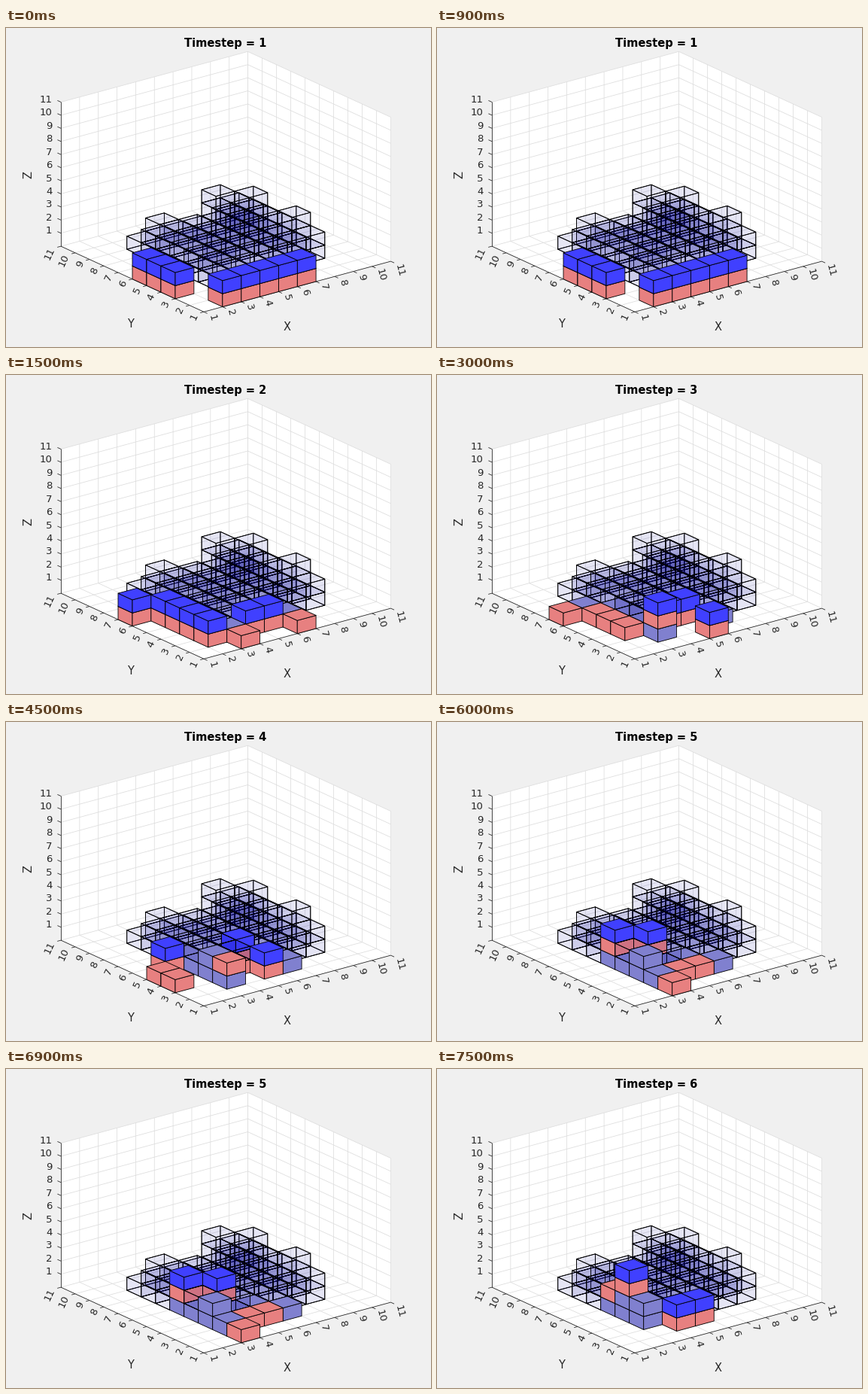
A matplotlib script that plays this animation: 565 px wide and 424 px high, repeating every 8 s.

```python
import numpy as np
import matplotlib.pyplot as plt
from matplotlib.animation import FuncAnimation
from matplotlib.collections import LineCollection, PolyCollection

W, H, DPI = 565, 424, 100
PX = 72 / DPI

ORIGIN = np.array([263.0, 377.3])
AXES = np.array([[24.85, -6.72], [-19.0, -8.72], [0.0, -17.42]])
LO, HI = 1, 11

INK = "#262626"
GRID = "#dedede"
ROBOT = (0.905, 0.5, 0.5, 1)
LOAD = (0.25, 0.25, 1, 1)
BLOCK = (0.5, 0.5, 0.81, 1)
PLAN = (0, 0, 0.6, 0.05)

# planned heights: rows are y = 3..8, columns x = 3..8
PLAN_HEIGHTS = [
    [2, 2, 1, 2, 2, 2],
    [2, 2, 2, 2, 2, 3],
    [1, 2, 2, 3, 3, 2],
    [2, 2, 2, 3, 3, 2],
    [2, 2, 2, 1, 2, 3],
    [1, 2, 1, 1, 3, 2],
]

# per step: robots with a load, robots without
LOADED = [
    [(x, 1) for x in range(2, 7)] + [(1, y) for y in (3, 4, 5)],
    [(2, y) for y in range(2, 6)] + [(1, 6), (4, 2), (5, 2)],
    [(3, 2), (4, 3), (5, 3), (5, 1)],
    [(2, 5), (5, 4), (5, 2)],
    [(3, 5), (4, 4)],
    [(3, 4), (4, 2), (5, 2)],
]
EMPTY = [
    [],
    [(3, 1), (6, 1)],
    [(1, 6), (2, 3), (2, 4), (2, 5)],
    [(1, 3), (1, 4), (3, 2), (4, 3)],
    [(3, 1), (4, 2), (5, 2)],
    [(3, 5)],
]
# blocks set down and picked up on the way into each step
PLACED = [
    [],
    [(3, 2), (6, 2)],
    [(3, 3), (3, 4), (3, 5), (2, 6)],
    [(3, 3), (4, 4)],
    [(5, 3)],
    [(3, 4)],
]
TAKEN = [[], [], [], [(2, 6)], [], [(3, 2), (6, 2)]]

FRONT = [
    [(0, 0, 0), (0, 1, 0), (0, 1, 1), (0, 0, 1)],
    [(0, 0, 0), (1, 0, 0), (1, 0, 1), (0, 0, 1)],
    [(0, 0, 1), (1, 0, 1), (1, 1, 1), (0, 1, 1)],
]
BACK = [
    [(0, 0, 0), (1, 0, 0), (1, 1, 0), (0, 1, 0)],
    [(1, 0, 0), (1, 1, 0), (1, 1, 1), (1, 0, 1)],
    [(0, 1, 0), (1, 1, 0), (1, 1, 1), (0, 1, 1)],
]


def project(points):
    return ORIGIN + (np.asarray(points, float) - (LO, LO, 0)) @ AXES


def stack_heights(step):
    heights = {}
    for s in range(step + 1):
        for cell in PLACED[s]:
            heights[cell] = heights.get(cell, 0) + 1
        for cell in TAKEN[s]:
            heights[cell] -= 1
    return heights


def scene(step):
    """Map each occupied unit cube to its colour."""
    cubes = {}
    for j, row in enumerate(PLAN_HEIGHTS):
        for i, top in enumerate(row):
            for z in range(top):
                cubes[i + 3, j + 3, z] = PLAN
    heights = stack_heights(step)
    for (x, y), top in heights.items():
        for z in range(top):
            cubes[x, y, z] = BLOCK
    for x, y in LOADED[step] + EMPTY[step]:
        cubes[x, y, heights.get((x, y), 0)] = ROBOT
    for x, y in LOADED[step]:
        cubes[x, y, heights.get((x, y), 0) + 1] = LOAD
    return cubes


def faces(step):
    polys, colors = [], []
    cubes = scene(step)
    for cell in sorted(cubes, key=lambda c: (-c[1], -c[0], c[2])):
        color = cubes[cell]
        sides = BACK + FRONT if color == PLAN else FRONT
        for side in sides:
            polys.append(project(np.add(side, cell)))
            colors.append(color)
    return polys, colors


def draw_box(ax):
    walls = [
        [(LO, LO, 0), (HI, LO, 0), (HI, HI, 0), (LO, HI, 0)],
        [(LO, HI, 0), (HI, HI, 0), (HI, HI, HI), (LO, HI, HI)],
        [(HI, LO, 0), (HI, HI, 0), (HI, HI, HI), (HI, LO, HI)],
    ]
    ax.add_collection(PolyCollection([project(w) for w in walls],
                                     facecolors="white", edgecolors="none"))
    grid = []
    for k in range(LO, HI + 1):
        grid += [
            [(k, LO, 0), (k, HI, 0), (k, HI, HI)],
            [(LO, k, 0), (HI, k, 0), (HI, k, HI)],
            [(LO, HI, k), (HI, HI, k), (HI, LO, k)],
        ]
    ax.add_collection(LineCollection([project(g) for g in grid],
                                     colors=GRID, linewidths=0.8 * PX))


def draw_rulers(ax):
    ends = [
        [(LO, LO, 0), (HI, LO, 0)],
        [(LO, LO, 0), (LO, HI, 0)],
        [(LO, HI, 0), (LO, HI, HI)],
    ]
    lines = [project(e) for e in ends]
    style = dict(color=INK, fontsize=13.3 * PX, rotation_mode="anchor")
    for k in range(LO, HI + 1):
        marks = [
            ((k, LO, 0), (4.6, 2.1), (9.5, 3.5), -75, "left"),
            ((LO, k, 0), (-4.8, 1.3), (-11, 2.5), 65, "right"),
            ((LO, HI, k), (-4.6, -2.1), (-11.5, -3), 0, "right"),
        ]
        for point, tick, gap, angle, side in marks:
            p = project(point)
            lines.append([p, p + tick])
            ax.text(*(p + gap), str(k), rotation=angle, ha=side,
                    va="center", **style)
    ax.add_collection(LineCollection(lines, colors=INK, linewidths=0.8 * PX))
    for x, y, name, angle in [(374, 397, "X", 0), (165, 394, "Y", 0),
                              (30, 195, "Z", 90)]:
        ax.text(x, y, name, rotation=angle, color=INK, ha="center",
                va="center", fontsize=14.67 * PX)


plt.rcParams["font.family"] = "DejaVu Sans"
fig = plt.figure(figsize=(W / DPI, H / DPI), dpi=DPI, facecolor="#f0f0f0")
ax = fig.add_axes([0, 0, 1, 1])
ax.set(xlim=(0, W), ylim=(H, 0))
ax.axis("off")

draw_box(ax)
draw_rulers(ax)
cubes_art = PolyCollection([], edgecolors="black", linewidths=0.85 * PX,
                           zorder=3)
ax.add_collection(cubes_art)
title = ax.text(291.5, 25, "", ha="center", va="baseline", weight="bold",
                fontsize=14.67 * PX)


def update(frame):
    step = frame // 3
    polys, colors = faces(step)
    cubes_art.set_verts(polys)
    cubes_art.set_facecolor(colors)
    title.set_text(f"Timestep = {step + 1}")
    return cubes_art, title


anim = FuncAnimation(fig, update, frames=16, interval=500,
                     init_func=lambda: update(0), repeat=True, repeat_delay=0)
plt.show()
```
